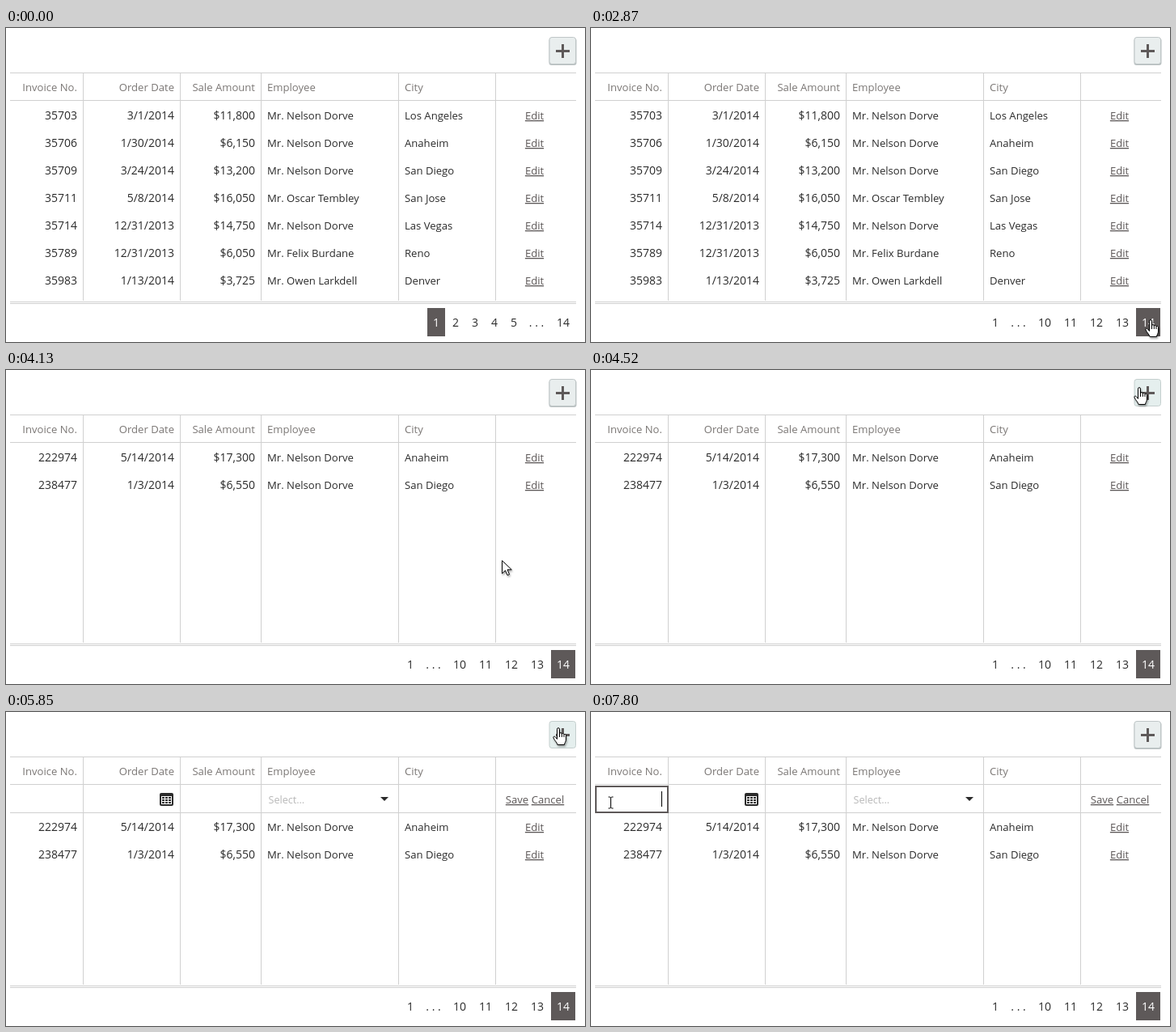
Animation, 716 px wide and 388 px high, one loop 8 s. Source, as an HTML page:

```html
<!DOCTYPE html>
<html lang="en">
<head>
<meta charset="utf-8">
<title>Invoice grid</title>
<style>
  html, body { margin: 0; width: 100%; height: 100%; overflow: hidden; background: #fff; }
  svg { display: block; width: 716px; height: 388px; }
  text { font: 13.1px "Open Sans", "Noto Sans", sans-serif; fill: #2b2b2b; }
  .num { font-size: 14px; }
  .end { text-anchor: end; }
  .mid { text-anchor: middle; }
  .head { fill: #7b7775; }
  .link { fill: #5c5757; text-decoration: underline; }
  .hint { fill: #b8b8b8; font-size: 12.6px; }
  .on { fill: #fff; }
  .line { stroke: #d0d0d0; fill: none; }
  .pointer { fill: #fff; stroke: #000; stroke-linejoin: round; filter: drop-shadow(1px 2px 1px #0005); }
</style>
</head>
<body>
<svg viewBox="0 0 716 388">
  <g id="button">
    <rect id="shade" x="671.5" y="12.5" width="34" height="33.5" rx="3" fill="#b9c0c1"/>
    <rect id="face" x="672" y="11.5" width="32.5" height="33" rx="3"/>
    <path d="M680 28.5h17M688.5 20v17" stroke="#5e5959" stroke-width="3"/>
  </g>
  <path class="line" d="M5 55.5h700M5 89.5h700M5 338.5h700M5 340.5h700M95.5 55v282M215.5 55v282M315.5 55v282M485.5 55v282M605.5 55v282"/>
  <g id="head"></g>
  <g id="first"></g>
  <g id="last"></g>
  <g id="pagerFirst"></g>
  <g id="pagerLast"></g>
  <g id="editor">
    <path class="line" d="M5 124.5h700"/>
    <rect x="190" y="100" width="17" height="16" rx="2" fill="#2b2b2b"/>
    <path d="M192 104h13v10h-13z" fill="#fff"/>
    <path d="M193 106h11M193 109h11M193 112h11" stroke="#2b2b2b" stroke-width="2" stroke-dasharray="3 1"/>
    <text class="hint" x="324.5" y="113">Select...</text>
    <path d="M463 105h10l-5 5z" fill="#2b2b2b"/>
    <text class="link mid" x="632" y="113">Save</text>
    <text class="link mid" x="670" y="113">Cancel</text>
    <rect id="focus" x="6" y="92" width="89" height="32" fill="none" stroke="#5e5959" stroke-width="2"/>
    <path id="caret" d="M87.5 98v19" stroke="#000"/>
  </g>
  <rect id="veil" x="21" y="42" width="695" height="330" fill="#fff"/>
  <g id="cursor">
    <path id="arrow" class="pointer" d="M.5.5v16l4-3.8 2.5 5.8 2.5-1-2.5-5.7h5.3z"/>
    <g id="hand" class="pointer" transform="translate(-7 0)">
      <path d="M5.5 14.5V2.2a1.5 1.5 0 0 1 3 0V8a1.4 1.4 0 0 1 2.8 0v.5a1.4 1.4 0 0 1 2.7.2v.6a1.3 1.3 0 0 1 2.5.4V15c0 3-2 4-2 6.5H6c0-2-3.5-5-5-8.5-.7-1.8 1.2-2.4 2.2-1.3z"/>
      <path d="M8.5 8v4M11.3 8.5V12M14 9.3V12"/>
    </g>
    <path id="beam" d="M-3-7h2l1 1 1-1h2M0-6V6M-3 7h2l1-1 1 1h2" fill="none" stroke="#000"/>
  </g>
</svg>
<script>
const $ = id => document.getElementById(id);
const show = (id, on) => $(id).setAttribute('visibility', on ? 'inherit' : 'hidden');
const text = (s, x, y, cls) => `<text class="${cls}" x="${x}" y="${y}">${s}</text>`;

const columns = [[88, 'num end'], [208, 'num end'], [308, 'num end'], [323, ''], [493, ''], [653.5, 'link mid']];
const row = (cells, y) => cells.map((s, i) => text(s, ...[columns[i][0], y, columns[i][1]])).join('');
const rows = list => list.map((cells, i) => row([...cells, 'Edit'], 113 + 34 * i)).join('');

$('head').innerHTML = ['Invoice No.', 'Order Date', 'Sale Amount', 'Employee', 'City']
  .map((s, i) => text(s, columns[i][0], 78, i < 3 ? 'head end' : 'head')).join('');

const main = 'Mr. Nelson Dorve';
$('first').innerHTML = rows([
  ['35703', '3/1/2014', '$11,800', main, 'Los Angeles'],
  ['35706', '1/30/2014', '$6,150', main, 'Anaheim'],
  ['35709', '3/24/2014', '$13,200', main, 'San Diego'],
  ['35711', '5/8/2014', '$16,050', 'Mr. Oscar Tembley', 'San Jose'],
  ['35714', '12/31/2013', '$14,750', main, 'Las Vegas'],
  ['35789', '12/31/2013', '$6,050', 'Mr. Felix Burdane', 'Reno'],
  ['35983', '1/13/2014', '$3,725', 'Mr. Owen Larkdell', 'Denver']
]);
$('last').innerHTML = rows([
  ['222974', '5/14/2014', '$17,300', main, 'Anaheim'],
  ['238477', '1/3/2014', '$6,550', main, 'San Diego']
]);

function pager(id, left, width, current, items) {
  $(id).innerHTML = `<rect x="${left}" y="346" width="${width}" height="35" fill="#5e5959"/>` +
    items.map(([s, x]) => text(s, x, 369, s === current ? 'num mid on' : 'num mid')).join('');
}
pager('pagerFirst', 521, 22, '1',
  [['1', 532], ['2', 556], ['3', 580], ['4', 604], ['5', 628], ['. . .', 656], ['14', 689]]);
pager('pagerLast', 674, 30, '14',
  [['1', 500], ['. . .', 528.5], ['10', 561], ['11', 593], ['12', 625], ['13', 657], ['14', 689]]);

const easeIn = p => p * p;
const easeOut = p => p * (2 - p);
const easeBoth = p => p * p * (3 - 2 * p);
// start, end, easing, then from, control and to points
const moves = [
  [1430, 1770, easeOut, [711, 360], [700, 368], [692, 360]],
  [3860, 4520, easeBoth, [692, 360], [528, 190], [678, 21]],
  [4520, 4640, easeBoth, [678, 21], [682, 21], [683, 19]],
  [5910, 6435, easeIn, [683, 19], [450, 20], [222, 30]],
  [6435, 6720, easeOut, [222, 30], [90, 40], [24.5, 112]]
];

function cursorAt(t) {
  const [start, end, ease, a, b, c] = moves.findLast(m => t >= m[0]) || moves[0];
  const p = ease(Math.max(0, Math.min(1, (t - start) / (end - start))));
  return a.map((v, i) => (1 - p) ** 2 * v + 2 * p * (1 - p) * b[i] + p * p * c[i]);
}

function draw(t) {
  const [x, y] = cursorAt(t);
  const editing = t >= 5850, onLast = t >= 3160;
  const onButton = t >= 1430 && x > 671 && x < 705 && y > 11 && y < 45;
  const onPage = x > 674 && x < 704 && y > 346;
  const onField = editing && y > 90 && x < 215;
  const pressed = t >= 5200 && t < 5630;

  show('first', !onLast);
  show('last', onLast);
  $('last').setAttribute('transform', `translate(0 ${editing ? 34 : 0})`);
  show('pagerFirst', t < 2870);
  show('pagerLast', t >= 2870);
  $('veil').setAttribute('opacity', t < 2900 || onLast ? 0 : t < 3000 ? 0.25 : 0.5);

  show('shade', !onButton);
  $('face').setAttribute('fill', pressed ? '#d5dfde' : onButton ? '#e5efee' : '#e9eeee');
  $('face').setAttribute('stroke', onButton ? '#c4cfce' : '#bfc6c7');

  show('editor', editing);
  show('focus', t >= 6910);
  show('caret', t >= 6910 && (t < 7340 || t >= 7800));
  if (!editing) ['focus', 'caret'].forEach(id => show(id, false));

  show('cursor', t >= 1430);
  $('cursor').setAttribute('transform', `translate(${Math.round(x - .5) + (onField ? .5 : 0)} ${Math.round(y)})`);
  const kind = onField ? 'beam' : onButton || onPage ? 'hand' : 'arrow';
  for (const id of ['arrow', 'hand', 'beam']) show(id, t >= 1430 && id === kind);
}

const begin = performance.now();
function tick() {
  draw((performance.now() - begin) % 8000);
  requestAnimationFrame(tick);
}
tick();
</script>
</body>
</html>
```
